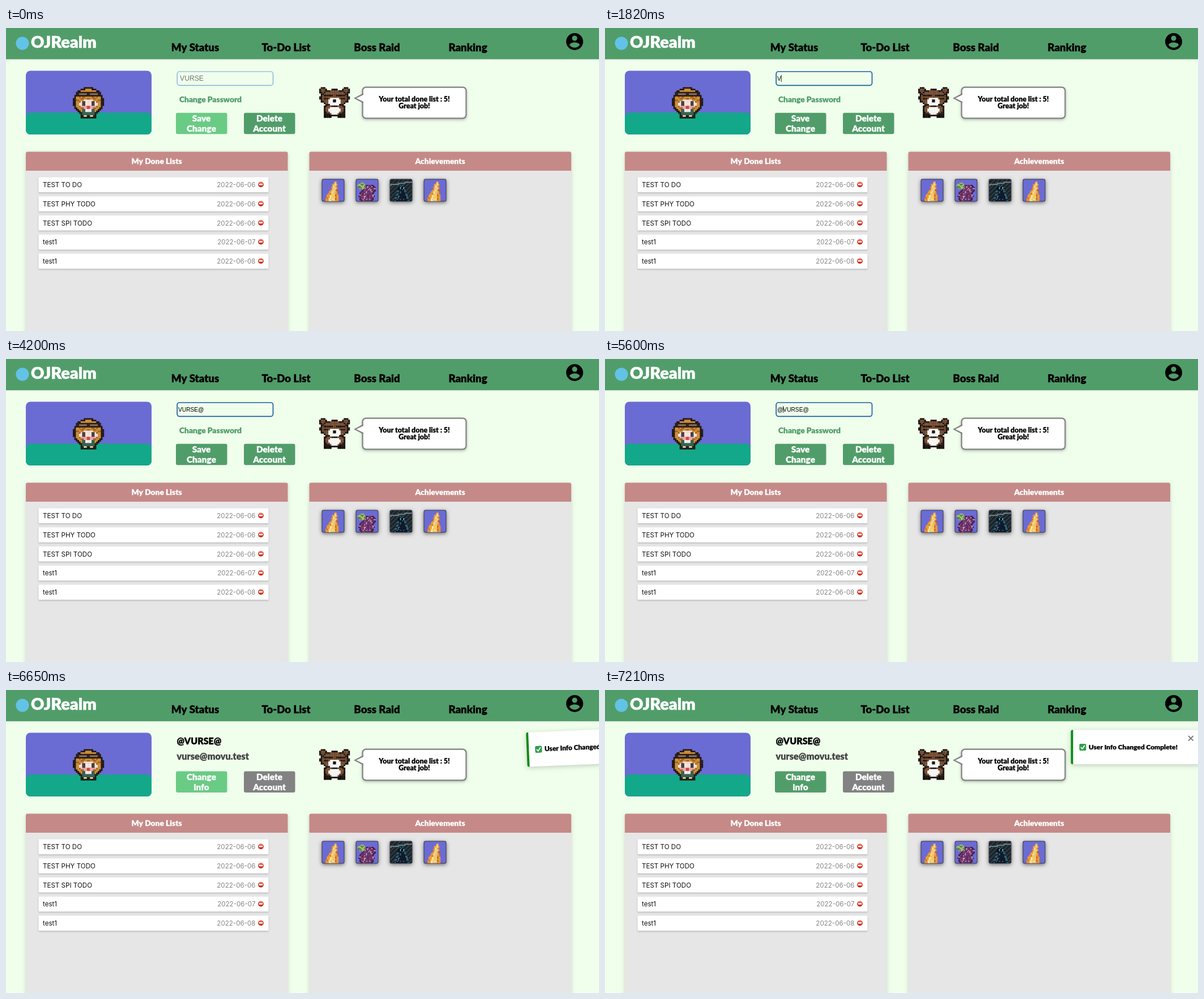
Write an HTML page with a canvas that moves like this. It is 1047 px wide and 535 px high and loops after 8 s.

```html
<!DOCTYPE html>
<html lang="en">
<head>
<meta charset="utf-8">
<title>Profile edit</title>
<style>
  html, body { margin: 0; width: 100%; height: 100%; overflow: hidden; background: #f0ffec; }
  canvas { display: block; width: 1047px; height: 535px; }
</style>
</head>
<body>
<canvas id="stage"></canvas>
<script>
const W = 1047, H = 535, LOOP = 8000, TICK = 70;
const GREEN = '#519d6a', LIT = '#6acb85', GREY = '#828282', VIOLET = '#6b6bd4';
const ROUND = 'Lato, "Open Sans", sans-serif';
const PLAIN = '"Liberation Sans", Arial, sans-serif';
const LIST = 'Inter, Roboto, sans-serif';
const USER = 'VURSE', NEW_NAME = `@${USER}@`;

// Moments of the story, in ms
const LEAVE = 560, FOCUS = 840, HOME = 4340, PREFIX = 4550, HOVER = 5880, BLUR = 6160;
const SAVED = 6580, CALM = 7000, SETTLED = 7210;
const KEYS = [1820, 1960, 2100, 3150, 3360, 3640];
const BLINK = 525;

const canvas = document.getElementById('stage');
const g = canvas.getContext('2d');
const dpr = window.devicePixelRatio || 1;
canvas.width = W * dpr;
canvas.height = H * dpr;

function box(x, y, w, h, color, r = 0) {
  g.fillStyle = color;
  g.beginPath();
  g.roundRect(x, y, w, h, r);
  g.fill();
}

function shadow(blur, dy, color, draw) {
  g.save();
  g.shadowBlur = blur * dpr;
  g.shadowOffsetY = dy * dpr;
  g.shadowColor = color;
  draw();
  g.restore();
}

function disc(x, y, r, color) {
  g.fillStyle = color;
  g.beginPath();
  g.arc(x, y, r, 0, Math.PI * 2);
  g.fill();
}

function line(points, width, color) {
  g.lineWidth = width;
  g.strokeStyle = color;
  g.beginPath();
  points.forEach(([x, y]) => g.lineTo(x, y));
  g.stroke();
}

function arrow(x, y, w, h, color) {
  g.fillStyle = color;
  g.beginPath();
  g.moveTo(x, y);
  g.lineTo(x + w, y - h);
  g.lineTo(x + w, y + h);
  g.fill();
}

function label(str, x, y, font, color, align = 'left') {
  g.font = font;
  g.textAlign = align;
  g.fillStyle = color;
  g.fillText(str, x, y);
}

// Heavy text with softened corners
function round(str, x, y, size, color, align) {
  label(str, x, y, `900 ${size}px ${ROUND}`, color, align);
  g.lineJoin = 'round';
  g.lineWidth = size * 0.02;
  g.strokeStyle = color;
  g.strokeText(str, x, y);
}

// Block art: shade(i, j) gives the colour of each cell of a 20 x 20 grid
function blocks(x, y, unit, shade) {
  for (let j = 0; j < 20; j++) {
    for (let i = 0; i < 20; i++) {
      const color = shade(i, j);
      if (!color) continue;
      g.fillStyle = color;
      g.fillRect(x + i * unit, y + j * unit, unit + 0.2, unit + 0.2);
    }
  }
}

// Below 1 inside the ellipse
const oval = (dx, dy, rx, ry) => Math.hypot(dx / rx, dy / ry);
const noise = (i, j) => Math.abs(Math.sin(i * 12.99 + j * 78.23) * 43758.55) % 1;

function heroine(i, j) {
  const u = Math.abs(i - 9.5);
  if (j > 17) return u < 5 ? (j === 18 && u > 1 && u < 3 ? '#f3cdb5' : '#22180f') : null;
  if (j > 2 && j < 6 && u < 7) return j === 4 && u > 1 && u < 6 ? '#8a7358' : '#2b1c10';
  if (oval(u, j - 10.5, 5.6, 3) < 1) {
    if (j > 8 && j < 12 && u > 2 && u < 4) return '#4b3f3c';
    if (j > 11) return u < 1 ? '#d9443e' : '#f2aca0';
    return '#fbe6d8';
  }
  if (j > 13 && u < 4) return u < 2 && j < 16 ? '#f4f0ea' : '#37604c';
  const hair = oval(u, j - 8.8, 9.8, 9.4);
  if (hair > 1) return null;
  if (hair > 0.86) return '#22180f';
  return noise(u, j) < 0.22 ? '#a5641f' : '#d2902f';
}

function bear(i, j) {
  const u = Math.abs(i - 9.5);
  if (oval(u, j - 9, 4.2, 2.6) < 1) return u < 1 && j > 7 && j < 10 ? '#1b120d' : '#f7f5f2';
  if (j === 5 && u > 1 && u < 7 || j === 7 && u > 4 && u < 7) return '#1b120d';
  const head = oval(u, j - 6.5, 9.6, 5.6);
  if (head < 0.85) return '#6f452b';
  const ear = oval(u - 7.5, j - 1.8, 2.6, 2.4);
  if (ear < 0.6) return '#6f452b';
  if (head < 1 || ear < 1) return '#140d0a';
  if (oval(u, j - 14.5, 3.6, 3) < 1) return '#f7f5f2';
  const body = oval(u, j - 14, 7.5, 4.5);
  if (body < 0.8) return '#6f452b';
  return body < 1 || j > 16 && u > 2 && u < 7 ? '#140d0a' : null;
}

function fireBeast(i, j) {
  const neck = 11 - (j - 5) * 0.2;
  const width = 1.2 + Math.max(0, j - 2) * 0.32 + Math.sin(j * 1.9) * 0.5;
  const d = Math.abs(i - neck) / width;
  if (j < 2 || d > 1) return null;
  if (d < 0.5) return noise(i, j) < 0.3 ? '#fff0b5' : '#ffcf58';
  return noise(i, j) < 0.2 ? '#c9541f' : '#ee9a30';
}

function dragon(i, j) {
  if (oval(i - 4.5, j - 5.5, 4, 2.8) < 1) return noise(i, j) < 0.4 ? '#5c7f4a' : '#9ec46a';
  const body = Math.min(oval(i - 9, j - 15, 7, 7), oval(i - 12, j - 8.5, 6, 4.2));
  if (body > 1) return null;
  if (body > 0.87) return '#35183f';
  const n = noise(i, j);
  return n < 0.14 ? '#c9a3ad' : n < 0.45 ? '#8f3b66' : '#5a2861';
}

function reaper(i, j) {
  if (Math.abs(j - 4.5 + i * 0.15) < 0.6) return '#75858c';
  const d = Math.abs(i - 10) - (2 + (j - 5) * 0.35);
  if (j > 4 && d < 0) {
    if (j > 6 && j < 9) return i % 3 === 0 ? '#59c8dc' : '#05070a';
    if (d > -1.2 && j % 3) return '#2b6d86';
    return noise(i, j) < 0.15 ? '#4a6b7d' : '#0f1a2b';
  }
  return (i + j) % 4 === 0 ? '#33474d' : null;
}

function header() {
  box(0, 0, W, 55.3, GREEN);
  disc(29, 27, 11.5, '#62c3e6');
  round('OJRealm', 44, 35.3, 28.8, '#fff');
  ['My Status', 'To-Do List', 'Boss Raid', 'Ranking'].forEach((name, i) =>
    round(name, 334 + i * 160.5, 41.3, 18.6, '#000', 'center'));
  disc(1004, 24, 15, '#000');
  disc(1004, 18, 4.6, GREEN);
  g.fillStyle = GREEN;
  g.beginPath();
  g.moveTo(995, 30);
  g.bezierCurveTo(996, 24, 1012, 24, 1013, 30);
  g.bezierCurveTo(1009, 36.4, 999, 36.4, 995, 30);
  g.fill();
}

function avatar() {
  box(35, 75.5, 222, 112.5, VIOLET, 8);
  box(35, 149.3, 222, 38.7, '#13a88a', 8);
  blocks(118, 104.5, 2.75, heroine);
}

function bubble() {
  blocks(553, 104.5, 2.7, bear);
  shadow(5, 2, 'rgba(0,0,0,.25)', () => box(628.5, 103.5, 185, 57, GREY, 7));
  box(630.7, 105.7, 180.6, 52.6, '#fff', 5);
  arrow(614, 124, 17, 9, GREY);
  arrow(618.5, 124, 13.5, 6.5, '#fff');
  round('Your total done list : 5!', 721, 130, 12.4, '#000', 'center');
  round('Great job!', 721, 142, 12.4, '#000', 'center');
}

function panel(x, title) {
  shadow(6, 2, 'rgba(0,0,0,.16)', () => box(x, 218.5, 462.5, 340, '#e6e6e6', 3));
  box(x, 218.5, 462.5, 33.5, '#c58a88', [3, 3, 0, 0]);
  round(title, x + 231, 240, 13.8, '#fff', 'center');
}

function doneList() {
  panel(35, 'My Done Lists');
  const items = ['TEST TO DO', 'TEST PHY TODO', 'TEST SPI TODO', 'test1', 'test1'];
  items.forEach((name, i) => {
    const y = 263.5 + i * 33.75;
    const day = Math.max(6, i + 4);
    shadow(3, 1.5, 'rgba(0,0,0,.2)', () => box(57.5, y, 406, 26.5, '#fff', 1));
    label(name, 65, y + 17.7, `11.6px ${LIST}`, '#111');
    label('2022-06-0' + day, 440.5, y + 17.7, `11.6px ${LIST}`, '#858585', 'right');
    const red = g.createLinearGradient(0, y + 8, 0, y + 18);
    red.addColorStop(0, '#f08a78');
    red.addColorStop(0.5, '#d9331f');
    red.addColorStop(1, '#c02a18');
    disc(450, y + 12.7, 5, red);
    box(446.7, y + 11.6, 6.6, 2.3, '#fff', 0.5);
  });
}

function achievements() {
  panel(535.5, 'Achievements');
  [fireBeast, dragon, reaper, fireBeast].forEach((beast, i) => {
    const x = 557.5 + i * 60, y = 266.5;
    shadow(7, 2, 'rgba(0,0,0,.55)', () => box(x, y, 40, 40, '#38384c', 3));
    box(x + 1, y + 1, 38, 38, beast === reaper ? '#1b2328' : VIOLET, 2);
    blocks(x + 1, y + 1, 1.9, beast);
  });
}

function button(x, y, color, top, bottom) {
  box(x, y, 90.5, 37.5, color, 3);
  round(top, x + 45, y + 15.7, 15.4, '#fff', 'center');
  round(bottom, x + 45, y + 33.7, 15.4, '#fff', 'center');
}

function fieldText(t) {
  if (t >= PREFIX) return NEW_NAME;
  return NEW_NAME.slice(1, 1 + KEYS.filter(k => k <= t).length);
}

function caretIndex(t, text) {
  if (t >= PREFIX) return 1;
  return t >= HOME ? 0 : text.length;
}

function form(t) {
  const focused = t >= FOCUS && t < BLUR;
  g.lineWidth = focused ? 1.7 : 1.2;
  g.strokeStyle = focused ? '#175f9f' : '#70a7d8';
  g.beginPath();
  g.roundRect(302.2, 77, 169.3, 24.3, 4);
  g.stroke();

  const text = fieldText(t);
  if (text) label(text, 304, 92.7, `10.2px ${PLAIN}`, '#000');
  else label(USER, 307, 92.6, `12.2px ${PLAIN}`, '#757575');

  // The blink starts over with every input
  const lastInput = [FOCUS, ...KEYS, HOME, PREFIX].filter(k => k <= t).pop();
  if (focused && (t - lastInput) % (2 * BLINK) < BLINK) {
    g.font = `10.2px ${PLAIN}`;
    box(304 + g.measureText(text.slice(0, caretIndex(t, text))).width, 83, 0.9, 12, '#000');
  }

  round('Change Password', 306, 130.5, 13.8, GREEN);
  button(300, 149.7, t < LEAVE || t >= HOVER ? LIT : GREEN, 'Save', 'Change');
  button(420, 149.7, GREEN, 'Delete', 'Account');
}

function profile(t) {
  round(NEW_NAME, 301.5, 95.5, 16, '#000');
  round('vurse@movu.test', 301.5, 122.7, 16.3, '#444');
  button(300, 143.5, t < CALM ? LIT : GREEN, 'Change', 'info');
  button(420, 143.5, GREY, 'Delete', 'Account');
}

// Slides in from the right while a damped swing dies out
function toast(t) {
  const s = Math.min(1, (t - SAVED) / (SETTLED - SAVED));
  const slide = 225 * Math.max(0, 1 - 3.1 * s) ** 2;
  const degrees = -3.9 * Math.sqrt(1 - s) * Math.cos(2.5 * Math.PI * s);
  g.save();
  g.translate(935 + slide, 100.7);
  g.rotate(degrees * Math.PI / 180);
  g.translate(-935, -100.7);
  shadow(8, 2, 'rgba(0,0,0,.2)', () => box(822.5, 70.5, 240, 60.5, '#fff', 3));
  box(822.5, 70.5, 4, 60.5, '#0b8a14', [3, 0, 0, 3]);
  box(837.5, 95, 12, 12, '#2f9e4c', 2);
  line([[840, 101], [842.7, 104], [847, 97.7]], 1.8, '#fff');
  round('User Info Changed Complete!', 854, 104.7, 11.9, '#000');
  for (const k of [-4.3, 4.3]) line([[1034.3 - k, 81], [1034.3 + k, 89.6]], 1.8, '#777');
  g.restore();
}

function draw(now) {
  const t = Math.floor((now % LOOP) / TICK) * TICK;
  g.setTransform(dpr, 0, 0, dpr, 0, 0);
  box(0, 0, W, H, '#f0ffec');
  header();
  avatar();
  bubble();
  doneList();
  achievements();
  if (t < SAVED) {
    form(t);
  } else {
    profile(t);
    toast(t);
  }
}

const start = performance.now();
function frame() {
  draw(performance.now() - start);
  requestAnimationFrame(frame);
}
frame();
</script>
</body>
</html>
```
